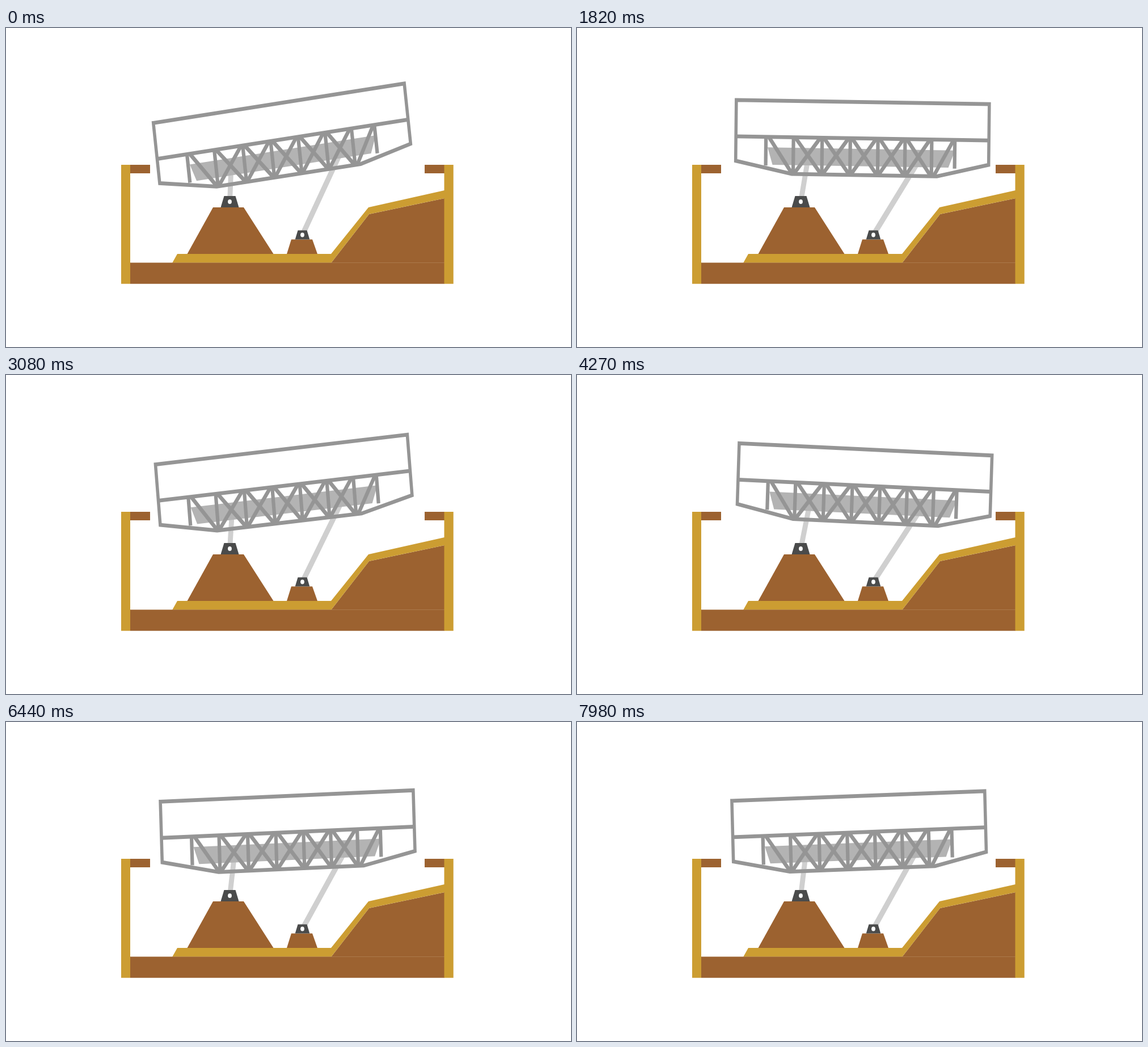
Recreate the animation shown at these times as an HTML page with a canvas. Size 996 by 562 pixels, loop 8000 ms.

```html
<!DOCTYPE html>
<html lang="en">
<head>
<meta charset="utf-8">
<title>Rocking bridge</title>
<style>
html, body { margin: 0; width: 100%; height: 100%; overflow: hidden; background: #fff; }
canvas { display: block; width: 996px; height: 562px; }
</style>
</head>
<body>
<canvas id="stage" width="996" height="562"></canvas>
<script>
const ctx = document.getElementById('stage').getContext('2d');
const LOOP = 8000, STEP = 70;
const SQUEEZE = 0.82; // the whole scene is narrowed horizontally, so rotation shears slightly
const LOW = -9.1, HIGH = 7.15; // deck slope in degrees at either end of its travel
const BROWN = '#9c6230', OCHRE = '#cc9d32', STEEL = '#959595';
const STRIP = '#b3b3b3', ARM = '#cfcfcf', DARK = '#4a4b4b';

// Rising gathers speed; falling slows halfway. The deck rests between strokes.
const rise = s => s * (0.65 + 0.35 * s * s);
const fall = s => 1 - s - 0.09 * Math.sin(2 * Math.PI * s);
const strokes = [
  { start: -20, end: 1110, ease: rise },
  { start: 1470, end: 2650, ease: fall },
  { start: 2650, end: 4620, ease: rise },
  { start: 5385, end: 6940, ease: fall },
  { start: 6940, end: 8800, ease: rise }
];

function slopeAt(t) {
  const { start, end, ease } = strokes.filter(stroke => stroke.start <= t).pop();
  return LOW + (HIGH - LOW) * ease(Math.min(1, (t - start) / (end - start)));
}

function fill(color, ...points) {
  ctx.fillStyle = color;
  ctx.beginPath();
  points.forEach(([x, y]) => ctx.lineTo(x, y));
  ctx.fill();
}

function rect(color, x0, y0, x1, y1) {
  ctx.fillStyle = color;
  ctx.fillRect(x0, y0, x1 - x0, y1 - y0);
}

function trapezoid(color, y0, y1, topLeft, topRight, bottomLeft, bottomRight) {
  fill(color, [topLeft, y0], [topRight, y0], [bottomRight, y1], [bottomLeft, y1]);
}

// Builds the path in place, then strokes it with a pen that shares the squeeze.
function line(color, width, ...points) {
  ctx.beginPath();
  points.forEach(([x, y]) => ctx.lineTo(x, y));
  if (points.length > 2) ctx.closePath();
  ctx.save();
  ctx.setTransform(SQUEEZE, 0, 0, 1, 0, 0);
  ctx.strokeStyle = color;
  ctx.lineWidth = width;
  ctx.stroke();
  ctx.restore();
}

function drawGround() {
  rect(BROWN, 219, 241, 254, 256);
  rect(BROWN, 738, 241, 773, 256);
  rect(BROWN, 219, 414, 773, 450.7);
  fill(BROWN, [573, 414], [640, 328], [773, 300], [773, 414]);
  fill(OCHRE, [573, 398], [639, 316], [773, 286], [773, 300], [640, 328], [573, 414]);
  trapezoid(OCHRE, 398, 414, 302, 573.5, 293, 573.5);
  rect('#b28558', 219, 413.3, 773, 414);
  rect(OCHRE, 203, 241, 219, 450.7);
  rect(OCHRE, 772.5, 241, 788.7, 450.7);
  trapezoid(BROWN, 316, 398, 365, 419, 319.5, 471.5);
  trapezoid(BROWN, 372.5, 398, 503, 540, 495, 549);
}

function drawBracket([x, y], size) {
  trapezoid(DARK, y - 10 * size, y + 10 * size,
    x - 10 * size, x + 10 * size, x - 16 * size, x + 16 * size);
  ctx.fillStyle = '#fff';
  ctx.beginPath();
  ctx.ellipse(x, y, 3.4, 4, 0, 0, 2 * Math.PI);
  ctx.fill();
}

function drawTruss() {
  const top = 64, bottom = 128.6, postEnd = 114.5;
  const beam = (x0, y0, x1, y1) => line(STEEL, 7.6, [x0, y0], [x1, y1]);
  const postX = i => -121.5 + 51 * i - 0.45 * i * i;
  for (let i = 0; i < 6; i++) {
    const x = postX(i), next = postX(i + 1);
    beam(x, top, x, bottom);
    if (i === 5) break;
    beam(x + 3, top, next - 1, bottom);
    beam(next - 3, top, x + 1, bottom);
  }
  beam(-170, top, -170, postEnd);
  beam(163, top, 163, postEnd);
  beam(-165, top, -123, bottom);
  beam(161, top, 126, bottom);
  line(STEEL, 6.8, [-223, top], [223, top]);
  line(STEEL, 6.8, [-223, 0], [223, 0], [223, 107], [132, bottom], [-124, bottom], [-223, 107]);
}

function draw(t) {
  const a = slopeAt(t);
  const turn = Math.atan(SQUEEZE * Math.tan(a * Math.PI / 180));
  const cos = Math.cos(turn), sin = Math.sin(turn);
  const x = 501.4 + 2.6 * a + 0.034 * a * a;
  const y = 130.4 + 0.13 * a + 0.042 * a * a;
  const onDeck = (u, v) => [x + u * cos - SQUEEZE * v * sin, y + u / SQUEEZE * sin + v * cos];
  const leftPivot = [394.5, 306], rightPivot = [522.5, 364.5];

  ctx.setTransform(1, 0, 0, 1, 0, 0);
  rect('#fff', 0, 0, 996, 562);
  drawGround();
  line(ARM, 10.8, leftPivot, onDeck(-95, 98));
  line(ARM, 10.8, rightPivot, onDeck(102, 98));
  drawBracket(leftPivot, 1);
  drawBracket(rightPivot, 0.8);

  ctx.setTransform(cos, sin / SQUEEZE, -SQUEEZE * sin, cos, x, y);
  trapezoid(STRIP, 82.5, 113, -167, 163.5, -158, 152);
  drawTruss();
}

function tick() {
  const t = performance.now() % LOOP;
  draw(Math.floor(t / STEP) * STEP);
  requestAnimationFrame(tick);
}
tick();
</script>
</body>
</html>
```
